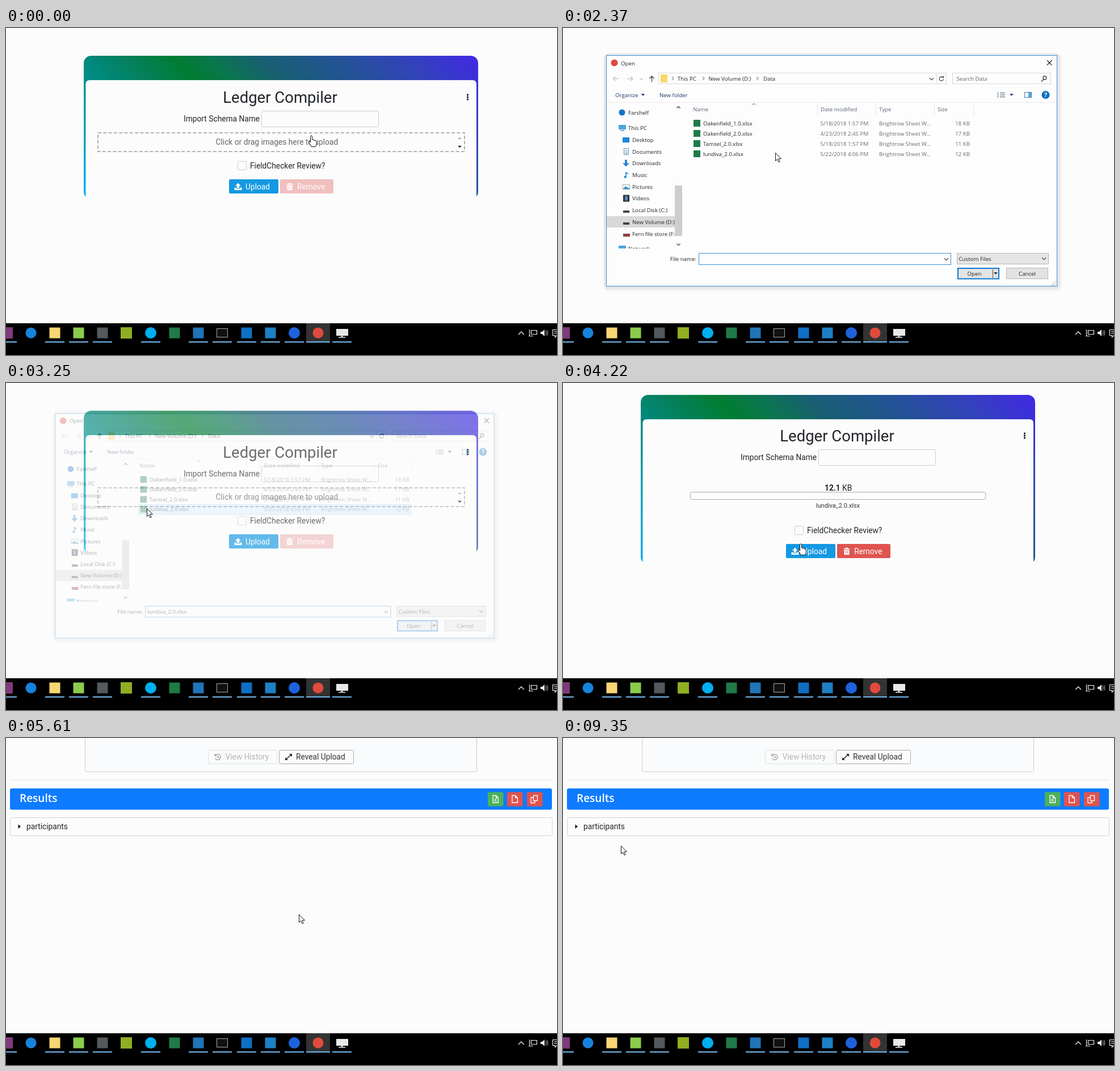
Animation, 971 px wide and 577 px high, one loop 9.92 s. Source, as an HTML page:

```html
<!DOCTYPE html>
<html lang="en">
<head>
<meta charset="utf-8">
<title>Upload form</title>
<style>
html, body { margin: 0; width: 100%; height: 100%; overflow: hidden; background: #fcfcfc; }
svg { display: block; }
#stage { width: 100%; height: 100%; }
text { white-space: pre; }
.page { font: 13.75px Roboto, sans-serif; }
.dialog { font: 9.7px "Open Sans", sans-serif; }
</style>
</head>
<body>
<svg id="stage" viewBox="0 0 971 577"></svg>
<script>
const LOOP = 9920;
const rect = (x, y, w, h, fill, more = '') =>
  `<rect x="${x}" y="${y}" width="${w}" height="${h}" fill="${fill}" ${more}/>`;
const box = (x, y, w, h, fill, stroke, rx = 0) =>
  rect(x + .5, y + .5, w - 1, h - 1, fill, `stroke="${stroke}" rx="${rx}"`);
const text = (x, y, s, fill = '#212529', more = '') =>
  `<text x="${x}" y="${y}" fill="${fill}" ${more}>${s}</text>`;
const dot = (x, y, r, fill) => `<circle cx="${x}" cy="${y}" r="${r}" fill="${fill}"/>`;
const line = (d, stroke, w = 1) => `<path d="${d}" fill="none" stroke="${stroke}" stroke-width="${w}"/>`;
const shape = (d, fill) => `<path d="${d}" fill="${fill}"/>`;
const group = (s, x, y, more = '') => `<g transform="translate(${x} ${y})" ${more}>${s}</g>`;
const down = (x, y, fill = '#222', r = 3.5) => shape(`M${x - r} ${y - r / 2}h${2 * r}l${-r} ${r}z`, fill);
const chevron = (x, y, stroke = '#444', r = 3.5) => line(`M${x - r} ${y - r / 2}l${r} ${r} ${r} ${-r}`, stroke, 1.2);
const MID = 'text-anchor="middle"', END = 'text-anchor="end"';

// ---- web page ----
const STOPS = [[0, '#00b0f0'], [.14, '#00a0b4'], [.25, '#008b82'], [.34, '#04805c'], [.43, '#007d32'], [.5, '#0a764e'],
  [.59, '#195f72'], [.72, '#225493'], [.86, '#3342bb'], [1, '#4128e6']];

function card(y, h, bodyY) {
  const id = 'grad' + bodyY, cx = 484.5, cy = y + h / 2, q = (695 + h) / 4;
  return `<linearGradient id="${id}" gradientUnits="userSpaceOnUse" x1="${cx - q}" y1="${cy + q}" x2="${cx + q}" y2="${cy - q}">` +
    STOPS.map(([o, c]) => `<stop offset="${o}" stop-color="${c}"/>`).join('') + '</linearGradient>' +
    rect(137, y, 695, h, `url(#${id})`, 'rx="13"') +
    shape(`M140.5 ${y + h + 1}V${bodyY + 7}q0-7 7-7H822q7 0 7 7V${y + h + 1}z`, '#fcfcfc');
}

const form = y => group(
  text(483, 131.5, 'Ledger Compiler', '#212529', MID + ' font-size="27.5"') +
  [118, 122, 126].map(v => dot(813.5, v, 1.7, '#212529')).join('') +
  text(313, 165, 'Import Schema Name') + box(450, 146, 207, 29, '#fcfcfc', '#ccc', 2), 0, y);

const drop = (y, hover) => group(
  (hover ? rect(163, 186, 629, 32, '#ededed') : '') +
  rect(162, 185, 646, 33, 'none', 'stroke="#9c9c9c" stroke-width="1.6" stroke-dasharray="6 3.3"') +
  text(369.5, 206, 'Click or drag images here to upload', '#666') +
  shape('M796 196h7l-3.5-3.5z', '#aaa') + down(799.5, 209.5), 0, y);

const check = y => group(box(408, 235, 16, 16, '#fcfcfc', '#ccc', 1) + text(430, 247.5, 'FieldChecker Review?'), 0, y);

const buttons = (y, red) => group(
  rect(393, 267, 87, 25, '#1499e2', 'rx="2"') +
  shape('M409 273.5l5 5h-3v4h-4v-4h-3zM402.5 281.5h3.5v2h6v-2h3.5v4.5h-13z', '#fff') +
  text(422, 284.5, 'Upload', '#fff') +
  rect(483, 267, 94, 25, red, 'rx="2"') +
  shape('M494.5 275h3.5v-1.5h4v1.5h3.5v1.5h-11zM495.5 277.5h9v8.5h-9z', '#fff') +
  line('M498.5 279v5M501.5 279v5', red) + text(513, 284.5, 'Remove', '#fff'), 0, y);

const home = card(49, 253, 92) + form(0) + drop(0) + check(0) + buttons(0, '#f0bfbe');

const ready = card(21, 299, 64) + form(-29) +
  text(461, 189.5, '<tspan font-weight="700">12.1</tspan> KB') +
  rect(224.5, 192.5, 520, 13, '#fcfcfc', 'stroke="#aaa" rx="3"') +
  '<rect id="bar" x="225.5" y="193.5" height="11" rx="2" fill="#1499e2"/>' +
  text(484.5, 219.5, 'lundiva_2.0.xlsx', '#333', MID + ' font-size="11"') +
  check(17) + `<g id="buttons">${buttons(17, '#df544f')}</g>`;

const again = card(21, 299, 113) + form(21) + drop(22, true) + check(21);

const sheet = x => line(`M${x - 4.5} 101.5h5.5l4 4v8.5h-9.5zM${x + 1} 101.5v4h4`, '#fff', 1.3);
const results =
  box(139, -7, 691, 67, '#fafbfc', '#ccc', 2) +
  box(356, 21, 122, 25, '#fafbfc', '#e0e0e0', 2) +
  line('M369 30.5a5 5 0 1 1-.5 5M368 27.5v4h4M373.5 31v3.5h2.5', '#aaa', 1.5) +
  text(386.5, 38, 'View History', '#b5b5b5') +
  box(481, 21, 132, 25, '#fcfcfc', '#aaa', 2) +
  line('M493.5 37.5l9-8', '#222', 1.5) + shape('M504 28v5l-5-5zM492 39v-5l5 5z', '#222') +
  text(511, 38, 'Reveal Upload', '#333') +
  rect(7, 74, 956, 1, '#e4e4e4') + rect(7, 89, 955, 37.5, '#0f7bff', 'rx="3"') +
  text(24, 112.5, 'Results', '#fff', `style="font:600 19px 'Open Sans',sans-serif"`) +
  [[849, '#4bb15c'], [883, '#e0534e'], [918, '#e0534e']].map(([x, c]) => rect(x, 95.5, 27.5, 25, c, 'rx="2"')).join('') +
  sheet(862.5) + line('M860.5 107l4 5M864.5 107l-4 5', '#fff', 1.2) + sheet(896.5) +
  line('M929.5 101.5h7v9h-7zM929.5 105h-4.5v9.5h7v-4', '#fff', 1.3);
const rows = box(7, 140, 956, 33, '#fcfcfc', '#d4d4d4', 2) + shape('M21.5 152.5v7.5l4.5-3.75z', '#111') +
  text(36, 161, 'participants');

// ---- file dialog ----
const icons = {
  pc: rect(-6, -5, 13, 8, '#4aa6e0') + rect(-3, 4, 7, 1.5, '#789'),
  desk: rect(-6, -4, 12, 9, '#1a86d8'),
  doc: box(-4, -6, 9, 12, '#fff', '#78909c') + line('M-2-2h5M-2 1h5M-2 3.5h5', '#4a90c8'),
  load: shape('M-2-6h4v6h4l-6 6-6-6h4z', '#2b82d4'),
  music: line('M0 4V-5q1 3 4 3', '#1a86d8', 1.6) + dot(-1.5, 4, 2, '#1a86d8'),
  pic: box(-6, -4, 13, 9, '#fff', '#8aa') + shape('M-5 4l4-5 3 2 4 2v1z', '#3b8fcf'),
  film: rect(-5, -6, 11, 12, '#263238') + rect(-2, -4, 5, 8, '#5a86b8'),
  disk: rect(-5, 1, 11, 4, '#444'),
  share: rect(-5, 0, 12, 5, '#555') + line('M0 0l5 5M5 0l-5 5', '#d22', 1.8),
  cloud: dot(0, 0, 5.5, '#1673c8')
};
const places = [['cloud', 'Farshelf', 149, 1], ['pc', 'This PC', 176, 1], ['desk', 'Desktop', 197], ['doc', 'Documents', 218],
  ['load', 'Downloads', 238.5], ['music', 'Music', 259], ['pic', 'Pictures', 280], ['film', 'Videos', 300.5],
  ['disk', 'Local Disk (C:)', 321], ['disk', 'New Volume (D:)', 342], ['share', 'Fern file store (F:)', 363], ['pc', 'Network', 389, 1]];
const files = [['Oakenfield_1.0.xlsx', '5/18/2018 1:57 PM', 18], ['Oakenfield_2.0.xlsx', '4/23/2018 2:45 PM', 17],
  ['Tamsel_2.0.xlsx', '5/18/2018 1:57 PM', 11], ['lundiva_2.0.xlsx', '5/22/2018 4:06 PM', 12]];

const dialog =
  rect(71, 44, 808, 420, '#f0f0f0', 'rx="11"') + rect(73, 46, 802, 414, '#e4e4e4', 'rx="6"') +
  box(76, 48, 795, 408, '#fdfdfd', '#3a92d8') +
  dot(90.5, 61.5, 6, '#df4a3c') + text(102, 65.5, 'Open') + line('M853 57l8.5 8.5M861.5 57l-8.5 8.5', '#222', 1.2) +
  line('M98 89.5h-9.5m4-4l-4 4 4 4M113.5 89.5h9.5m-4-4l4 4-4 4', '#c4c4c4', 1.3) + chevron(138.5, 90, '#bbb', 2) +
  line('M156.5 95v-10m-4 4l4-4 4 4', '#444', 1.4) +
  box(168, 79, 508, 20, '#fdfdfd', '#d9d9d9') + rect(172, 82, 12, 14, '#fbd76b') +
  [192, 246, 341].map(x => line(`M${x} 86l3 3-3 3`, '#555')).join('') +
  text(202, 92.5, 'This PC') + text(256.5, 92.5, 'New Volume (D:)') + text(353, 92.5, 'Data') +
  chevron(649.5, 90) + rect(658, 80, 1, 18, '#ddd') + line('M669.5 87a3.7 3.7 0 1 0 1 3M670.5 84.5v3h-3', '#444', 1.2) +
  box(686, 79, 174, 20, '#fdfdfd', '#d9d9d9') + text(693.5, 93, 'Search Data', '#666') +
  '<circle cx="849" cy="88" r="3" fill="none" stroke="#444" stroke-width="1.3"/>' + line('M847 90.5l-4 4', '#444', 1.6) +
  text(92, 121.5, 'Organize', '#1b3a66') + down(141, 118, '#1b3a66') + text(170, 121.5, 'New folder', '#1b3a66') +
  line('M765 114.5h3m2 0h9M765 118h3m2 0h9M765 121.5h3m2 0h9', '#789', 1.5) + down(790.5, 118, '#1b3a66') +
  box(813, 113, 13, 10, '#fff', '#3b7fb5') + rect(820, 114, 5, 8, '#5aa5dc') +
  dot(850.5, 118, 7, '#0f6cbd') + text(850.5, 122, '?', '#fff', MID + ' font-weight="700" font-size="11"') +
  rect(77, 131, 793, 1, '#ececec') +
  '<svg x="77" y="132" width="120" height="257" viewBox="77 132 120 257">' + rect(77, 332, 120, 20, '#d9d9d9') +
  places.map(([k, s, y, top]) => group(icons[k], top ? 104 : 111, y) + text(top ? 115 : 122, y + 3.5, s)).join('') + '</svg>' +
  rect(197, 278, 13, 89, '#cdcdcd') + line('M200.5 141.5l3-3 3 3', '#444', 1.3) + chevron(203.5, 382, '#444', 3) +
  [448, 551, 654, 723].map(x => rect(x, 133, 1, 21, '#e4e4e4')).join('') +
  [[229, 'Name'], [454, 'Date modified'], [557, 'Type'], [660, 'Size']].map(([x, s]) => text(x, 146.5, s, '#596579')).join('') +
  line('M333 136l3-3 3 3', '#666') +
  `<g id="pick">${box(226, 213, 495, 19, '#cce8ff', '#99d1ff')}</g>` +
  files.map(([name, date, kb], i) => {
    const y = 171.5 + 18 * i;
    return rect(230, y - 9.5, 12, 12, '#1f7a48') + text(247, y, name) + text(453.5, y, date, '#6d6d6d') +
      text(557, y, 'Brightrow Sheet W...', '#6d6d6d') + text(717, y, kb + ' KB', '#6d6d6d', END);
  }).join('') +
  text(235, 411, 'File name:', '#222', END) + box(239, 397, 445, 21, '#fdfdfd', '#3a92d8') +
  `<g id="picked">${text(243, 411.5, 'lundiva_2.0.xlsx')}</g>` + chevron(675.5, 408) +
  box(694, 397, 162, 20, '#e6e6e6', '#b5b5b5') + text(697.5, 411, 'Custom Files') + chevron(847.5, 407) +
  rect(696, 424, 72, 18.5, '#e3e3e3', 'stroke="#1079d0" stroke-width="2"') + rect(757, 426, 1, 15, '#555') +
  text(725, 437, 'Open', '#222', MID) + down(762.5, 433) +
  box(781, 423, 74, 20, '#e3e3e3', '#b5b5b5') + text(818, 437, 'Cancel', '#222', MID) +
  [[866, 447], [866, 450], [866, 453], [863, 450], [863, 453], [860, 453]].map(([x, y]) => rect(x, y, 1.5, 1.5, '#aaa')).join('');

// ---- taskbar ----
const tile = (x, c, r = 10) => rect(x - r, 538 - r, 2 * r, 2 * r, c);
const taskbar = rect(0, 521, 971, 56, '#000') + rect(529, 521, 42, 34, '#333') +
  [2, 86, 128, 170, 255, 339, 381, 424, 466, 508, 592].map(x => rect(x - 17, 553, 34, 2, '#76b9ed')).join('') +
  rect(529, 553, 42, 2, '#76b9ed') +
  tile(2, '#80397b') + dot(44, 538, 9.5, '#1783dc') + tile(86, '#f8d673', 9.5) + tile(128, '#8ccb4c', 9.5) +
  tile(170, '#53595c', 9.5) + tile(212, '#8fae22') + dot(255, 538, 10, '#00aff0') + tile(297, '#1f7a48', 9.5) +
  tile(339, '#2074b8', 9.5) + box(371, 530, 20, 16, '#111', '#aaa') + tile(424, '#0f6fc4', 9.5) +
  tile(466, '#1f80c4', 9.5) + dot(508, 538, 10, '#1d62dc') + dot(550, 538, 9.5, '#df4a3c') +
  rect(582, 531, 21, 12, '#e8e8e8') + rect(590, 543, 4, 2, '#aaa') + rect(586, 545, 12, 1.5, '#e8e8e8') +
  line('M903 541l5-5 5 5', '#eee', 1.3) + line('M925.5 533.5h10v7h-10zM922.5 532v11M921 543.5h8', '#eee', 1.2) +
  shape('M942 536h3l4-4v12l-4-4h-3z', '#eee') + line('M951 535q2 3 0 6M953 533q3.5 5 0 10', '#ccc') +
  line('M972 532.5h-8.5v10h4v3l3-3h2M966 535.5h6M966 538.5h6', '#eee', 1.2);

const stage = document.getElementById('stage');
stage.innerHTML = rect(0, 0, 971, 577, '#fcfcfc') +
  `<g class="page"><g id="home">${home}</g><g id="ready">${ready}</g><g id="again">${again}</g>
  <g id="results">${results}<g id="note">${text(7, 157, 'No tables called out', '#333')}</g><g id="rows">${rows}</g></g>
  <text id="dots" y="303.5" fill="#333" text-anchor="middle" letter-spacing="1"></text></g>
  <g id="dialog" class="dialog">${dialog}</g>${taskbar}
  <path id="cursor" fill="#fff" stroke="#111" stroke-linejoin="round"/>`;

const $ = id => document.getElementById(id);
const show = (id, on) => { $(id).style.display = on ? '' : 'none'; };
const ARROW = 'M.5.5V14.5l3.2-3 2.3 5.2 2.2-1-2.3-5h4.5z';
const HAND = 'M-1.5 12V1.5a1.5 1.5 0 0 1 3 0V7q2.8-1 2.8 1 2.5-1 2.7 1 2.3-.6 2.3 1.5v3.5q0 3-2 5.5H0q-1-3-5-8 0-2.2 2-1.4z';

// Pointer moves: start, end, number of steps, points passed.
const moves = [
  [60, 80, 2, [[534, 189]]],
  [440, 580, 3, [[520, 203], [510, 214]]],
  [720, 860, 3, [[508, 210], [509, 214]]],
  [1110, 1760, 10, [[415, 207], [378, 208], [300, 182], [264, 128], [297, 122], [340, 180], [439, 207]]],
  [2210, 2880, 10, [[330, 228], [244, 219]]],
  [3170, 4140, 14, [[250, 222], [343, 240], [460, 238], [530, 236], [419, 284]]],
  [4220, 5170, 14, [[419, 284], [460, 303], [603, 322], [516, 311]]],
  [7080, 7870, 12, [[480, 306], [252, 268], [182, 247], [115, 230], [98, 212], [101, 190]]],
  [8200, 8260, 2, [[102, 189]]],
  [9350, 9350, 1, [[102, 190]]]
];

// Share done after n evenly spaced steps, the first at a, the last at b.
function steps(t, a, b, n) {
  if (t < a) return 0;
  if (t >= b) return 1;
  return (Math.floor((t - a) / (b - a) * (n - 1)) + 1) / n;
}

function pointer(t) {
  let at = [538, 190];
  for (const [a, b, n, path] of moves) {
    if (t < a) break;
    const pts = [at, ...path], u = steps(t, a, b, n) * path.length;
    const i = Math.min(Math.floor(u), path.length - 1), f = u - i;
    at = pts[i].map((v, k) => Math.round(v + (pts[i + 1][k] - v) * f));
  }
  return at;
}

function draw(t) {
  const loaded = t >= 3390, sent = t >= 4366, done = t >= 5250;
  show('home', !loaded);
  show('ready', loaded && !done);
  show('again', done && t < 5610);
  show('results', done);
  show('buttons', !sent);
  $('bar').setAttribute('width', 518 * steps(t, 4293, 4877, 9));

  const scroll = steps(t, 5390, 5610, 4);
  const dx = t < 5330 ? 0 : Math.round(-7 * (1 - scroll)), dy = -372 * scroll;
  $('again').setAttribute('transform', `translate(${dx} ${dy})`);
  $('results').setAttribute('transform', `translate(${dx} ${372 + dy})`);
  show('note', t < 5390);
  show('rows', t >= 5390);

  show('dots', sent && t < 5610);
  $('dots').setAttribute('x', 485 + dx);
  $('dots').setAttribute('transform', `translate(0 ${dy})`);
  $('dots').textContent = '...'.slice(0, 1 + Math.floor(t / 300 + 1) % 3);

  const open = steps(t, 2210, 2360, 3) - steps(t, 3170, 3320, 3), k = .96 + .04 * open;
  show('dialog', open > 0);
  $('dialog').setAttribute('opacity', open);
  $('dialog').setAttribute('transform', `translate(${473.5 * (1 - k)} ${252 * (1 - k)}) scale(${k})`);
  show('pick', t >= 3020);
  show('picked', t >= 3020);

  const [x, y] = pointer(t);
  const onDrop = t < 2050 && x > 161 && x < 808 && y > 181 && y < 219;
  const onButton = loaded && !sent && x > 392 && x < 578 && y >= 284 && y < 310;
  $('cursor').setAttribute('d', onDrop || onButton ? HAND : ARROW);
  $('cursor').setAttribute('transform', `translate(${x} ${y})`);
}

const start = performance.now();
function tick() {
  draw((performance.now() - start) % LOOP);
  requestAnimationFrame(tick);
}
tick();
</script>
</body>
</html>
```
